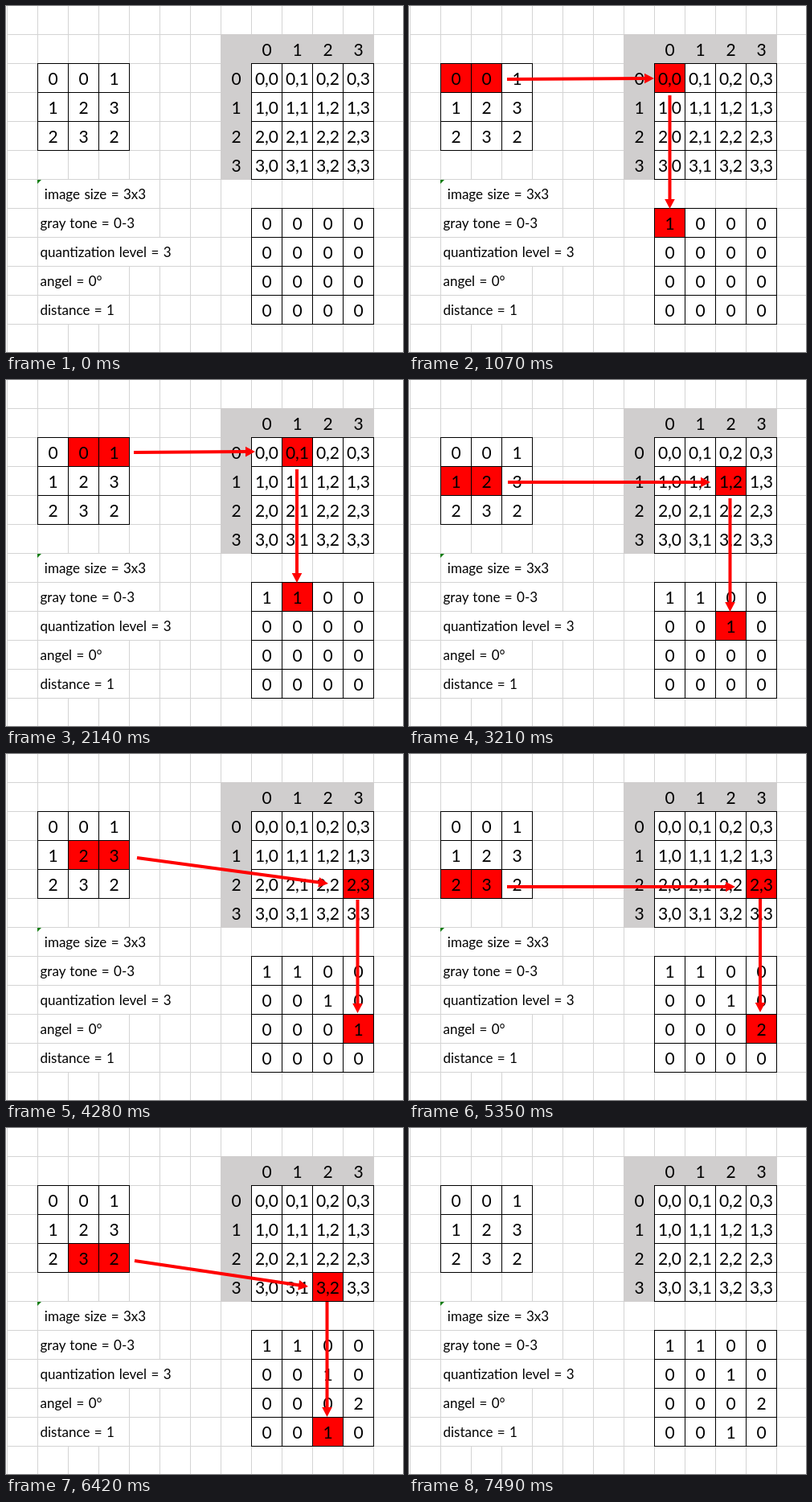
An HTML page that plays this animation: 494 px wide and 430 px high, repeating every 8.56 s.

```html
<!DOCTYPE html>
<html lang="en">
<head>
<meta charset="utf-8">
<title>Co-occurrence matrix</title>
<style>
  html, body { margin: 0; width: 100%; height: 100%; overflow: hidden; background: #fff; }
  svg { display: block; }
  text { font-family: Lato, sans-serif; fill: #000; white-space: pre; }
  .digit { font-size: 21px; text-anchor: middle; }
  .label { font-size: 17px; word-spacing: 1px; }
</style>
</head>
<body>
<svg id="stage" width="494" height="430" viewBox="0 0 494 430"></svg>
<script>
const STEP_MS = 1070, STEPS = 8;
const COL = 38, ROW = 36, RED = '#ff0000';
const stage = document.getElementById('stage');

// Sheet coordinates: column 0 starts at x = 1, row 0 at y = -1.
const colX = c => 1 + c * COL;
const rowY = r => -1 + r * ROW;

function add(parent, tag, attrs, content) {
  const node = document.createElementNS(stage.namespaceURI, tag);
  for (const key in attrs) node.setAttribute(key, attrs[key]);
  if (content !== undefined) node.textContent = content;
  parent.appendChild(node);
  return node;
}
const layer = () => add(stage, 'g', {});
const rect = (parent, x, y, width, height, fill) =>
  add(parent, 'rect', { x, y, width, height, fill });
const digit = (parent, c, r, value) =>
  add(parent, 'text', { x: colX(c) + 19.5, y: rowY(r) + 27, class: 'digit' }, value);
const fillCell = (parent, c, r) =>
  rect(parent, colX(c) + 1, rowY(r) + 1, COL - 1, ROW - 1, RED);

function lines(parent, c, r, cols, rows, color) {
  for (let i = 0; i <= cols; i++) rect(parent, colX(c + i), rowY(r), 1, rows * ROW + 1, color);
  for (let i = 0; i <= rows; i++) rect(parent, colX(c), rowY(r + i), cols * COL + 1, 1, color);
}

function arrow(parent, x1, y1, x2, y2) {
  const length = Math.hypot(x2 - x1, y2 - y1);
  const angle = Math.atan2(y2 - y1, x2 - x1) * 180 / Math.PI;
  const neck = length - 12;
  add(parent, 'path', {
    d: `M0-2H${neck}V-6.3L${length} 0L${neck} 6.3V2H0Z`,
    fill: RED,
    transform: `translate(${x1} ${y1}) rotate(${angle})`
  });
}

const image = [[0, 0, 1], [1, 2, 3], [2, 3, 2]];
const labels = [
  [' image size = 3x3', 4],
  ['gray tone = 0-3', 4],
  ['quantization level = 3', 5],
  ['angel = 0°', 3],
  ['distance = 1', 3]
];
// Image cell of each pair, its matrix entry, and the two arrows.
const pairs = [
  { at: [0, 0], hit: [0, 0], across: [122, 91, 305, 90], down: [324.5, 111, 324.5, 252] },
  { at: [0, 1], hit: [0, 1], across: [159, 90, 310, 89], down: [362, 111, 362, 252] },
  { at: [1, 0], hit: [1, 2], across: [123, 127, 375, 127], down: [399.5, 147, 399.5, 288] },
  { at: [1, 1], hit: [2, 3], across: [163, 129, 401, 161], down: [437.5, 181, 437.5, 322] },
  { at: [2, 0], hit: [2, 3], across: [122, 165, 406, 165], down: [437, 180, 437, 321] },
  { at: [2, 1], hit: [3, 2], across: [160, 165, 376, 197], down: [399.5, 216, 399.5, 359] }
];

const sheet = layer(), fills = layer(), borders = layer(), texts = layer(), arrows = layer();

lines(sheet, 0, 0, 13, 12, '#d4d4d4');
rect(sheet, colX(7), rowY(1), 5 * COL + 1, ROW + 1, '#d0cece');
rect(sheet, colX(7), rowY(1), COL + 1, 5 * ROW + 1, '#d0cece');
labels.forEach(([label, span], i) => {
  const y = rowY(6 + i);
  rect(sheet, 40, y + 1, span * COL - 1, ROW - 1, '#fff');
  add(texts, 'text', { x: 42.5, y: y + 25, class: 'label' }, label);
});
add(sheet, 'path', { d: 'M39 216h5l-5 5z', fill: '#107c10' });

lines(borders, 1, 2, 3, 3, '#000');
lines(borders, 8, 2, 4, 4, '#000');
lines(borders, 8, 7, 4, 4, '#000');

image.forEach((row, r) => row.forEach((value, c) => digit(texts, 1 + c, 2 + r, value)));
const counters = [];
for (let r = 0; r < 4; r++) {
  digit(texts, 8 + r, 1, r);
  digit(texts, 7, 2 + r, r);
  for (let c = 0; c < 4; c++) {
    digit(texts, 8 + c, 2 + r, `${r},${c}`);
    counters.push(digit(texts, 8 + c, 7 + r, 0));
  }
}

function show(step) {
  fills.replaceChildren();
  arrows.replaceChildren();
  const counts = Array(16).fill(0);
  for (const { hit: [r, c] } of pairs.slice(0, step)) counts[r * 4 + c]++;
  counters.forEach((node, i) => { node.textContent = counts[i]; });

  const pair = pairs[step - 1];
  if (!pair) return;
  const [r, c] = pair.at, [hr, hc] = pair.hit;
  fillCell(fills, 1 + c, 2 + r);
  fillCell(fills, 2 + c, 2 + r);
  fillCell(fills, 8 + hc, 2 + hr);
  fillCell(fills, 8 + hc, 7 + hr);
  arrow(arrows, ...pair.across);
  arrow(arrows, ...pair.down);
}

let current = -1;
const start = performance.now();
function tick() {
  const step = Math.floor((performance.now() - start) / STEP_MS) % STEPS;
  if (step !== current) show(current = step);
  requestAnimationFrame(tick);
}
tick();
</script>
</body>
</html>
```
